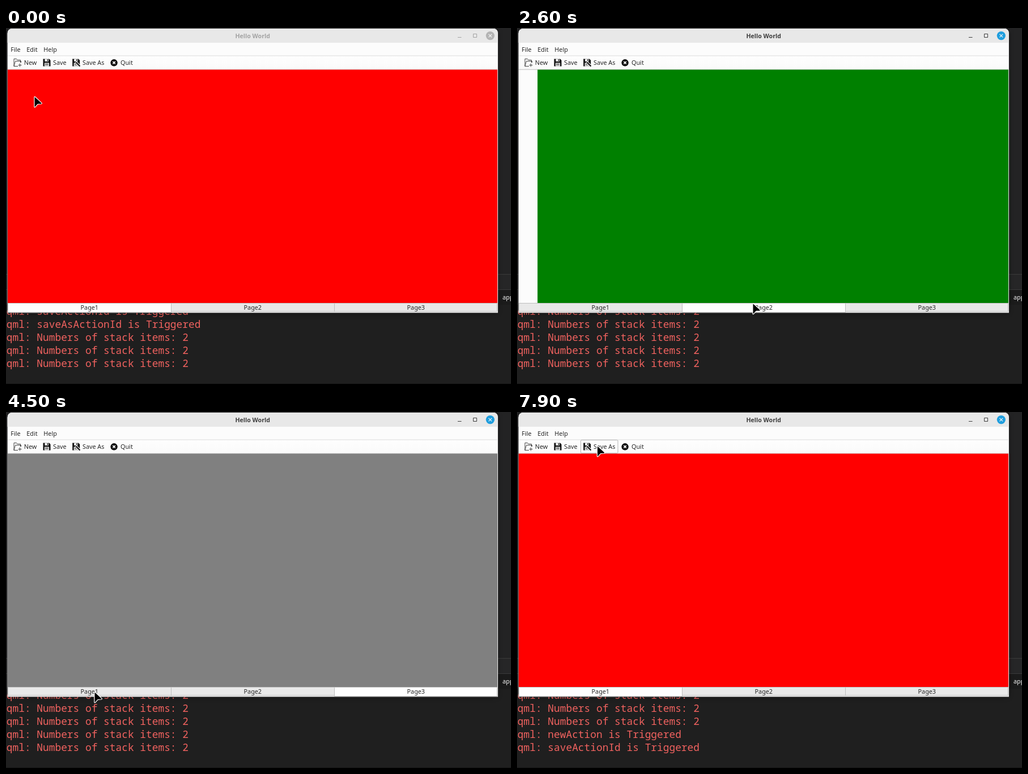
An HTML page that plays this animation: 891 px wide and 628 px high, repeating every 8000 ms.

```html
<!DOCTYPE html>
<html lang="en">
<head>
<meta charset="utf-8">
<title>Hello World</title>
<style>
  html, body { margin: 0; width: 100%; height: 100%; overflow: hidden; background: #1f1f1f; }
  svg { display: block; width: 891px; height: 628px; }
  text { font: 10.8px "Noto Sans", sans-serif; fill: #262626; white-space: pre; }
  #title { font-weight: 600; font-size: 10.6px; }
  #terminal text { font: 17.85px "Noto Sans Mono", monospace; fill: #f0625f; }
  .middle { text-anchor: middle; }
</style>
</head>
<body>
<svg viewBox="0 0 891 628">
  <defs>
    <linearGradient id="bar" x2="0" y2="1">
      <stop stop-color="#fefefe"/><stop offset="1" stop-color="#fafafa"/>
    </linearGradient>
    <filter id="shadow" x="-5%" y="-5%" width="110%" height="110%">
      <feGaussianBlur stdDeviation="4"/>
    </filter>
    <clipPath id="content"><rect x="3" y="73.5" width="864" height="411.5"/></clipPath>
    <g id="floppy">
      <path d="M0 0H10.5L13 2.5V13H0Z" fill="#111"/>
      <path d="M3 0H9.5V4.5H3ZM2.5 7H10.5V13H2.5Z" fill="#fff"/>
      <path d="M7 .8H8.6V3.8H7ZM3.5 8.6H9.5V9.4H3.5ZM3.5 10.8H9.5V11.6H3.5Z" fill="#111"/>
    </g>
  </defs>

  <!-- desktop behind the window -->
  <rect width="891" height="628" fill="#1f1f1f"/>
  <rect width="891" height="434" fill="#232324"/>
  <rect y="434" width="891" height="1" fill="#3b3b3b"/>
  <rect y="435" width="891" height="53" fill="#262627"/>
  <rect y="461" width="891" height="1" fill="#3b3b3b"/>
  <rect x="866" y="462" width="25" height="26" fill="#1b1b1b"/>
  <rect y="627" width="891" height="1" fill="#151515"/>
  <text x="876" y="479" style="fill:#f2f2f2">app</text>
  <g id="terminal"></g>
  <rect x="3" y="3" width="865" height="501" rx="6" opacity=".35" filter="url(#shadow)"/>

  <!-- window -->
  <path d="M2.5 502.5V10Q2.5 1 12 1H859Q868 1 868 10V502.5Z" fill="#d0d0d0"/>
  <path d="M3 501.5V10Q3 1 12 1H859Q867.5 1 867.5 10V501.5Z" fill="#fcfcfc"/>
  <path d="M2.5 26V10Q2.5 1 12 1H859Q868 1 868 10V26Z" fill="#e8e8e8"/>
  <text id="title" class="middle" x="435.2" y="17.6">Hello World</text>
  <g id="controls" fill="none">
    <path d="M797 16.5H803.5M824.5 10.5H830.5V16.5H824.5Z"/>
  </g>
  <circle id="close" cx="854.3" cy="13.6" r="7.6"/>
  <path d="M851.5 10.8L857.1 16.4M857.1 10.8L851.5 16.4" stroke="#f6f6f6" stroke-width="1.2"/>
  <g id="menus"></g>
  <rect x="3" y="49" width="864" height="24" fill="url(#bar)"/>
  <rect x="3" y="48.5" width="864" height="1" fill="#dedede"/>
  <rect x="3" y="72.7" width="864" height="1" fill="#bcbcbc"/>
  <g id="tools"></g>
  <g fill="none" stroke="#333">
    <path d="M14 67.5V54.5H18.5L20 56.5H25.5V61M14 67.5H21M14 67.5L16.5 58.5H26.5V61M24.5 62.5V68.5M21.5 65.5H27.5" stroke-width=".9"/>
  </g>
  <use href="#floppy" x="65.5" y="54.5"/>
  <use href="#floppy" x="117.2" y="54.5"/>
  <path d="M123 60L130 67" stroke="#fff" stroke-width="4"/>
  <path d="M123.5 60.5L130.5 67.5" stroke="#111" stroke-width="2.2"/>
  <circle cx="190.6" cy="61.3" r="6.2" fill="#111"/>
  <path d="M188.4 59.1L192.8 63.5M192.8 59.1L188.4 63.5" stroke="#fff" stroke-width="1.7"/>
  <g clip-path="url(#content)"><rect id="page" y="73" width="864" height="412"/></g>
  <g id="tabs"></g>

  <path id="cursor" fill="#000" stroke="#fff" stroke-width="1.2" stroke-linejoin="round"
    d="M.9 1.4V18.4Q1.1 20 2.7 18.8L6.2 14.8Q6.9 14 7.9 13.9L13.3 13.5Q15.2 12.9 13.7 11.4L2.5 1Q1.1 .1 .9 1.4Z"/>
</svg>

<script>
const LOOP = 8000, STEP = 100, SLIDE = 400, LEFT = 3, WIDTH = 864;
const $ = id => document.getElementById(id);

function add(parent, tag, attrs, content = '') {
  const node = document.createElementNS('http://www.w3.org/2000/svg', tag);
  set(node, attrs);
  node.textContent = content;
  return $(parent).appendChild(node);
}
function set(node, attrs) {
  for (const key in attrs) node.setAttribute(key, attrs[key]);
}

// Buttons: label, left edge, right edge, text position
const menus = [['File', 3, 32, 8.3], ['Edit', 32, 62, 36.3], ['Help', 62, 95, 66.3]]
  .map(([label, left, right, x]) => ({
    left, right,
    box: add('menus', 'rect', { x: left, y: 26, width: right - left, height: 22.5 }),
    text: add('menus', 'text', { x, y: 41.8 }, label)
  }));
const tools = [['New', 8.5, 60, 31.7], ['Save', 60, 112, 83], ['Save As', 112, 178.5, 135], ['Quit', 178.5, 230, 202]]
  .map(([label, left, right, x]) => {
    const box = add('tools', 'rect', { x: left + .5, y: 49.5, width: right - left - 1, height: 23, rx: 1.5 });
    add('tools', 'text', { x, y: 65.2 }, label);
    return { left, right, box };
  });

add('tabs', 'rect', { x: LEFT, y: 485, width: WIDTH, height: 16.5, fill: '#f4f4f4' });
const tabs = [0, 1, 2].map(i => {
  const x = LEFT + .5 + 288 * i;
  const box = add('tabs', 'rect', { x, y: 485.5, width: i < 2 ? 288 : 287, stroke: '#bdbdbd' });
  add('tabs', 'text', { class: 'middle', x: 147.3 + 288 * i, y: 497.4 }, 'Page' + (i + 1));
  return box;
});
const rows = [0, 1, 2, 3, 4].map(i => add('terminal', 'text', { x: .8, y: 505.5 + 23 * i }));

// Cursor stops: time, x, y
const stops = [
  [0, 49, 120.5], [500, 52, 65], [700, 52, 65], [1400, 160, 486], [1600, 160, 486],
  [1900, 423, 485.5], [2100, 423, 485.5], [2200, 415, 485.5], [2600, 415, 485.5],
  [3400, 681, 493.5], [3800, 681, 493.5], [4500, 155, 493.5], [4900, 155, 493.5],
  [5400, 50, 44], [5600, 44, 65.5], [6400, 44, 65.5], [6900, 98.5, 64],
  [7500, 98.5, 64], [7900, 140.5, 59.5], [LOOP, 140.5, 59.5]
];
// Page switches: visible from, slide start, tab index
const switches = [[0, -SLIDE, 0], [1500, 1400, 0], [2600, 2335, 1], [3700, 3584, 2], [4800, 4650, 0]];
const colors = ['#ff0000', '#008000', '#808080'];
const presses = [[5700, 5800], [6900, 7100]];

const count = 'Numbers of stack items: 2';
const log = [
  [0, 'saveActionId is Triggered'], [0, 'saveAsActionId is Triggered'],
  [0, count], [0, count], [0, count],
  [1500, count], [2600, count], [3700, count], [4800, count],
  [5800, 'newAction is Triggered'], [7100, 'saveActionId is Triggered']
];

function cursorAt(t) {
  const i = stops.findIndex(stop => stop[0] > t);
  const [t0, x0, y0] = stops[i - 1], [t1, x1, y1] = stops[i];
  const p = (t - t0) / (t1 - t0), e = p * p * (3 - 2 * p);
  return [x0 + (x1 - x0) * e, y0 + (y1 - y0) * e];
}

function draw(t) {
  const [x, y] = cursorAt(t);
  const over = (item, top, bottom) => x >= item.left && x < item.right && y >= top && y < bottom;
  set($('cursor'), { transform: `translate(${x} ${y})` });

  const active = t >= 1500;
  set($('title'), { style: `fill:${active ? '#3d3d3d' : '#a3a3a3'}` });
  set($('controls'), { stroke: active ? '#3d3d3d' : '#a3a3a3' });
  set($('close'), { fill: active ? '#1f9ede' : '#b4b4b4' });

  for (const menu of menus) {
    const hover = over(menu, 26, 49);
    set(menu.box, { fill: hover ? '#308cc6' : 'none' });
    set(menu.text, { style: hover ? 'fill:#fff' : '' });
  }
  const pressed = presses.some(([from, to]) => t >= from && t < to);
  for (const tool of tools) {
    const hover = over(tool, 49, 74);
    set(tool.box, {
      fill: !hover ? 'none' : pressed ? '#d9d9d9' : '#fdfdfd',
      stroke: hover ? '#b4b4b4' : 'none'
    });
  }

  const [, start, current] = switches.filter(s => s[0] <= t).pop();
  const rest = 1 - Math.min(1, (t - start) / SLIDE);
  set($('page'), { x: LEFT + WIDTH * rest ** 3, fill: colors[current] });
  tabs.forEach((tab, i) => set(tab, {
    fill: i === current ? '#fefefe' : '#e9e9e9',
    height: i === current ? 16 : 14.5
  }));

  const lines = log.filter(entry => entry[0] <= t).slice(-5);
  rows.forEach((row, i) => row.textContent = 'qml: ' + lines[i][1]);
}

function frame() {
  draw(Math.floor(performance.now() % LOOP / STEP) * STEP);
  requestAnimationFrame(frame);
}
frame();
</script>
</body>
</html>
```
